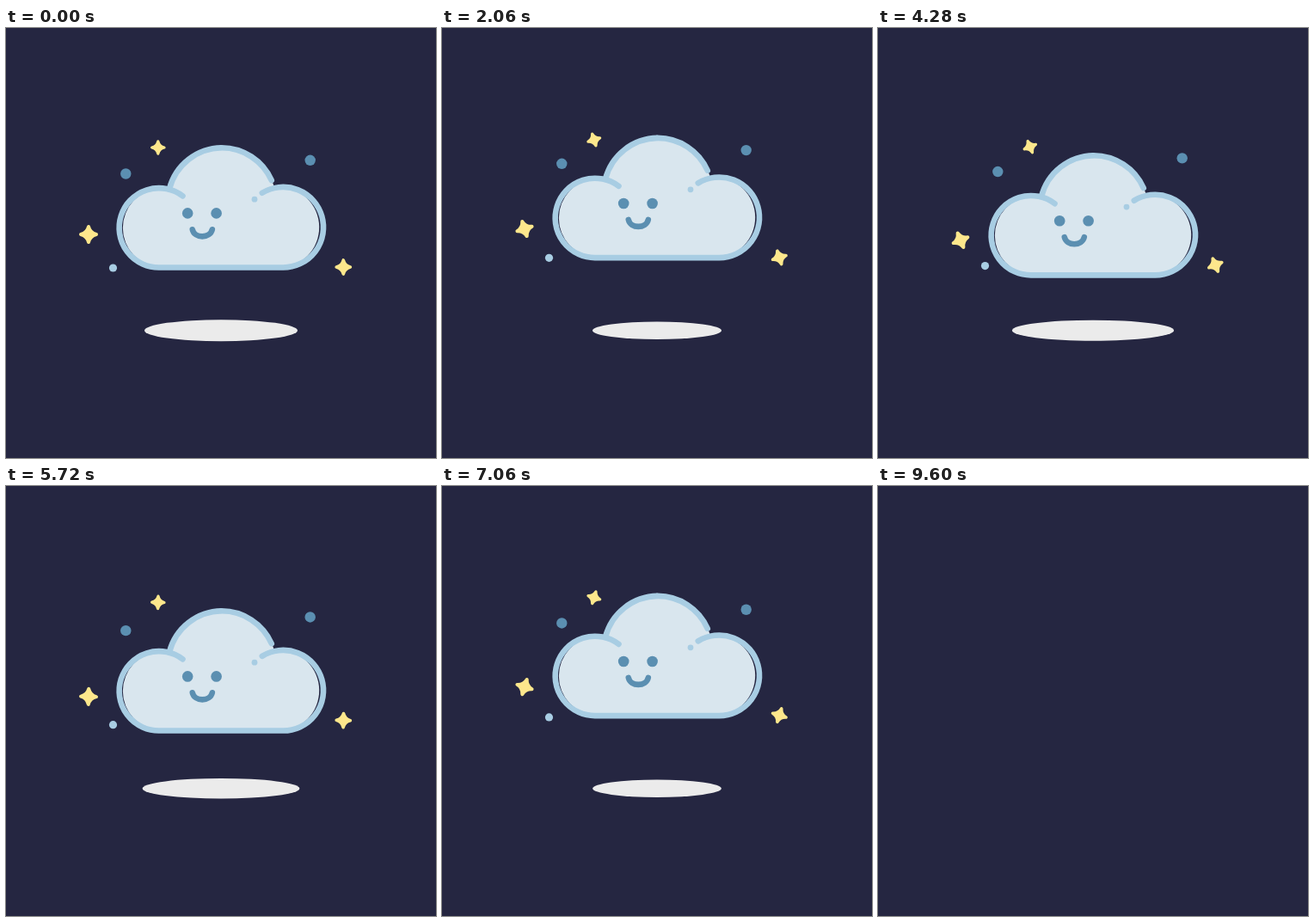
Recreate the animation shown at these times as an HTML page. Size 500 px wide and 500 px high, loop 9.62 s.

```html
<!DOCTYPE html>
<html lang="en">
<head>
<meta charset="utf-8">
<title>Floating cloud</title>
<style>
  html, body { margin: 0; width: 100%; height: 100%; overflow: hidden; background: #252641; }
  svg { display: block; width: 100%; height: 100%; }
  .line { fill: none; stroke: #a8cde3; stroke-width: 6.6; stroke-linecap: round; }
  .pale { fill: #d9e6ee; }
  .light { fill: #a8cde3; }
  .blue { fill: #5b8fb1; }
  .star { fill: #fde78c; stroke: #fde78c; stroke-width: 4; stroke-linejoin: round; }
</style>
</head>
<body>
<svg viewBox="0 0 500 500">
  <defs>
    <path id="star" class="star" d="M0-9Q1.8-1.8 9 0Q1.8 1.8 0 9Q-1.8 1.8-9 0Q-1.8-1.8 0-9Z"/>
  </defs>
  <g id="scene">
    <ellipse id="shadow" cx="250" cy="351.7" fill="#ebebeb"/>
    <g id="dots">
      <circle class="blue" cx="139.3" cy="169.5" r="6.2"/>
      <circle class="blue" cx="353.7" cy="153.8" r="6.2"/>
      <circle class="light" cx="124.5" cy="279" r="4.6"/>
    </g>
    <use id="leftStar" href="#star"/>
    <use id="topStar" href="#star"/>
    <use id="rightStar" href="#star"/>
    <g id="cloud">
      <path class="pale" d="M179 278.5A46.2 46.2 0 0 1 179 186.3L190 187A63.6 63.6 0 0 1 309 177L312 185A46.8 46.8 0 1 1 322.3 278.5Z"/>
      <path class="line" style="stroke-linecap:butt" d="M190 187A63.6 63.6 0 0 1 250.7 139.3"/>
      <path class="line" d="M250.7 139.3A63.6 63.6 0 0 1 308.8 177.2"/>
      <path class="line" d="M205.5 195.3A46.2 46.2 0 1 0 179 278.5H322.3A46.8 46.8 0 1 0 297.8 191.8"/>
      <circle class="light" cx="289" cy="199.2" r="3.4"/>
      <circle class="blue" cx="211.2" cy="215.4" r="6.3"/>
      <circle class="blue" cx="244.6" cy="215.4" r="6.3"/>
      <path class="line" style="stroke:#5b8fb1" d="M216.8 234.3C219 245 237.5 245 239.8 234.3"/>
    </g>
  </g>
</svg>
<script>
  const LOOP = 9620, END = 9600, QUARTER_TURN = 1140;
  const el = id => document.getElementById(id);
  const ease = p => (1 - Math.cos(Math.PI * p)) / 2;

  // Eased interpolation through values at the given key times.
  function through(times, values, t) {
    let i = 0;
    while (i < times.length - 2 && t > times[i + 1]) i++;
    const p = Math.min(1, (t - times[i]) / (times[i + 1] - times[i]));
    return values[i] + (values[i + 1] - values[i]) * ease(p);
  }

  const floatKeys = [0, 2400, 4900, 7300, END];
  const dotKeys = [0, 2200, 5180, 7600, END];
  const starKeys = [0, 2300, 4700, 7100, END];

  function placeStar(id, x, y, size, t) {
    const angle = 90 * t / QUARTER_TURN;
    el(id).setAttribute('transform', `translate(${x} ${y}) rotate(${angle}) scale(${size})`);
  }

  function draw(t) {
    el('scene').style.display = t < END ? '' : 'none';
    const drift = through(floatKeys, [0, -12, 12.4, -12, 0], t);
    el('cloud').setAttribute('transform', `translate(0 ${drift})`);
    el('shadow').setAttribute('rx', through(floatKeys, [89, 74.3, 97.4, 74.3, 89], t));
    el('shadow').setAttribute('ry', through(floatKeys, [12.5, 10.2, 12.3, 10.2, 12.5], t));
    el('dots').setAttribute('transform',
      `translate(0 ${through(dotKeys, [0, -11.8, 0, -11.4, 0], t)})`);
    placeStar('leftStar', 96, through(floatKeys, [240, 233.2, 249, 233.2, 240], t), 1, t);
    placeStar('topStar', 176.8, through(starKeys, [139, 129.8, 138.8, 129.8, 139], t), .8, t);
    placeStar('rightStar', 392.3, through(starKeys, [278, 266.6, 276.3, 266.6, 278], t), .9, t);
  }

  let start;
  function frame(now) {
    start ??= now;
    draw((now - start) % LOOP);
    requestAnimationFrame(frame);
  }
  draw(0);
  requestAnimationFrame(frame);
</script>
</body>
</html>
```
